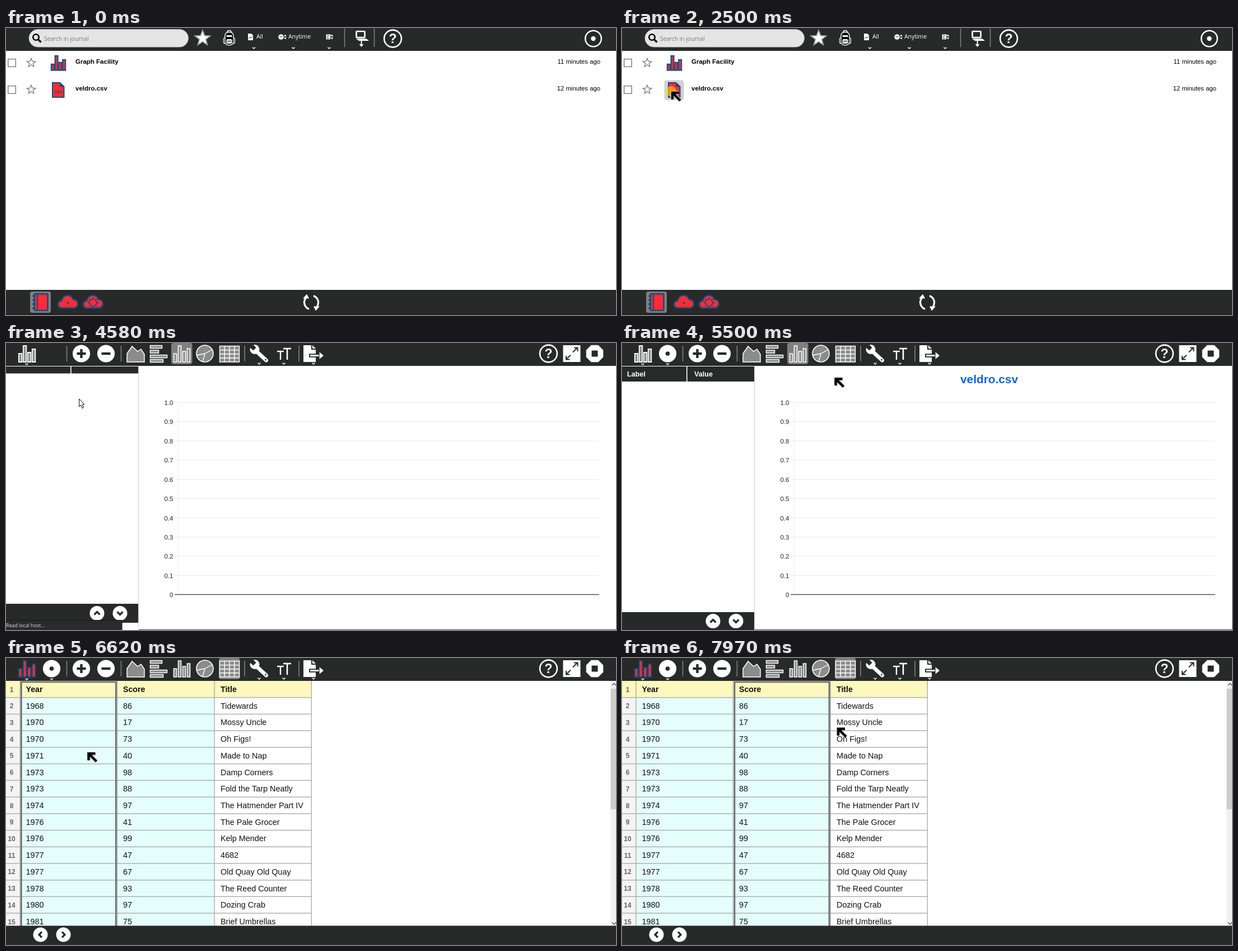
These frames come from a looping animation (1089x514 px, 8000 ms). An HTML page with a canvas:

```html
<!DOCTYPE html>
<html lang="en">
<head>
<meta charset="utf-8">
<title>Journal to chart</title>
<style>
html, body { margin: 0; width: 100%; height: 100%; overflow: hidden; background: #fff; }
canvas { display: block; }
</style>
</head>
<body>
<canvas id="stage" width="1089" height="514"></canvas>
<script>
const g = document.getElementById('stage').getContext('2d');
const LOOP = 8000;
const BAR = '#282a29', WHITE = '#fff', GRAY = '#808080', RED = '#ff2b34', BLUE = '#0d4d84';
const SANS = '"Liberation Sans", Arial, sans-serif', UI = '"Open Sans", sans-serif';
const FILE = 'veldro.csv';

// drawing helpers
function paint(fill, stroke, width = 1) {
  if (fill) { g.fillStyle = fill; g.fill(); }
  if (stroke) { g.strokeStyle = stroke; g.lineWidth = width; g.stroke(); }
}
function rect(x, y, w, h, fill, stroke, width, r = 0) {
  g.beginPath();
  g.roundRect(x, y, w, h, r);
  paint(fill, stroke, width);
}
function disc(x, y, r, fill, stroke, width) {
  g.beginPath();
  g.arc(x, y, r, 0, 7);
  paint(fill, stroke, width);
}
function poly(points, fill, stroke, width) {
  g.beginPath();
  points.forEach(p => g.lineTo(...p));
  g.closePath();
  paint(fill, stroke, width);
}
function line(points, color, width = 1) {
  g.beginPath();
  points.forEach(p => g.lineTo(...p));
  paint(null, color, width);
}
function text(s, x, y, font, color, align = 'left') {
  g.font = font;
  g.fillStyle = color;
  g.textAlign = align;
  g.fillText(s, x, y);
}
function star(x, y, r, fill, stroke, width) {
  const points = [];
  for (let i = 0; i < 10; i++) {
    const a = i * Math.PI / 5 - Math.PI / 2, d = i % 2 ? r * 0.42 : r;
    points.push([x + d * Math.cos(a), y + d * Math.sin(a)]);
  }
  poly(points, fill, stroke, width);
}
const chevron = (x, y = 37) => line([[x - 2.5, y - 1.5], [x, y + 1], [x + 2.5, y - 1.5]], WHITE, 1.4);
const separator = (x, top, bottom) => line([[x, top], [x, bottom]], GRAY, 1.6);

function bars(x, bottom, heights, fill, stroke, step, w, width) {
  heights.forEach((h, i) => rect(x + i * step, bottom - h, w, h, fill, stroke, width));
}
function help(x) {
  disc(x, 19, 15.4, null, WHITE, 2.6);
  text('?', x, 27, 'bold 23px ' + SANS, WHITE, 'center');
}
function arrowButton(x, y, dx, dy) {
  disc(x, y, 13, WHITE);
  const tip = [x + dx * 2.5, y + dy * 2.5];
  line([[tip[0] - dx * 5 + dy * 5, tip[1] - dy * 5 + dx * 5], tip,
    [tip[0] - dx * 5 - dy * 5, tip[1] - dy * 5 - dx * 5]], BAR, 3.2);
}

// journal screen
function searchField() {
  rect(41, 2.5, 284.5, 31.5, '#e5e5e5', '#c4c4c4', 1, 15.7);
  disc(53.5, 16.5, 5.2, null, '#000', 2.6);
  line([[57.5, 20.5], [62.5, 25.5]], '#000', 3.2);
  text('Search in journal', 68, 22.5, '10.2px ' + UI, '#777');
}
function backpack() {
  rect(395, 4.5, 7, 6, BAR, WHITE, 1.4, 3);
  rect(388.5, 17, 20, 11, '#000', WHITE, 1.2, 3);
  rect(391, 7.5, 15, 23, '#000', WHITE, 1.4, 6);
  rect(393.5, 13, 10, 3, WHITE);
  rect(393.5, 20, 10, 8, WHITE, null, 0, 2);
  line([[395, 23.5], [402, 23.5]], '#000', 1.2);
}
function filters() {
  const font = '10.4px ' + UI;
  poly([[432, 10], [438, 10], [441, 13], [441, 22], [432, 22]], WHITE);
  line([[433.5, 19], [436, 16], [437.5, 18], [440, 15]], BAR);
  text('All', 447, 19, font, WHITE);
  disc(491, 16, 4.8, WHITE);
  line([[488, 14], [491, 16.5], [494, 14]], BAR);
  rect(571.5, 11.5, 7.5, 9, WHITE);
  for (let y = 14; y < 20; y += 2.5) line([[573, y], [577, y]], BAR);
  line([[575, 18], [580, 12]], WHITE, 1.5);
  for (const x of [498.5, 582]) {
    poly([[x - 2.3, 15], [x, 11.5], [x + 2.3, 15]], WHITE);
    poly([[x - 2.3, 17], [x, 20.5], [x + 2.3, 17]], WHITE);
  }
  text('Anytime', 504, 19, font, WHITE);
  [442.5, 513, 577].forEach(x => chevron(x, 36));
}
function device() {
  rect(625.5, 6, 15, 11, null, WHITE, 2.6, 1);
  poly([[625, 19], [643, 19], [648, 23], [630, 23]], WHITE);
  line([[634.5, 22], [634.5, 32]], WHITE, 2);
  poly([[630.5, 29], [638.5, 29], [634.5, 34]], WHITE);
}
function csvIcon() {
  poly([[83, 98], [96, 98], [103.5, 105], [103.5, 124], [83, 124]], RED, BLUE, 2);
  poly([[96, 98], [96, 105], [103.5, 105]], BLUE);
  text('CSV', 93.5, 117, 'bold 7px ' + SANS, BLUE, 'center');
}
function journalRow(y, name, age) {
  rect(3.7, y - 6.3, 13.6, 13.6, WHITE, '#707070', 1.3);
  star(45, y + 0.5, 8.2, WHITE, '#707070', 1.2);
  text(name, 124, y + 2, 'bold 11.5px ' + SANS, '#000');
  text(age, 1061, y + 2, '11.3px ' + SANS, '#000', 'right');
}
function cloud(x) {
  g.beginPath();
  g.moveTo(x - 12, 501.5);
  g.bezierCurveTo(x - 20, 500, x - 19, 488, x - 11, 488.5);
  g.bezierCurveTo(x - 9, 476, x + 6, 476, x + 9, 486);
  g.bezierCurveTo(x + 20, 486, x + 20, 500, x + 11, 501.5);
  g.closePath();
  paint(RED, BLUE, 2.6);
}
function syncIcon() {
  for (const turn of [0, Math.PI]) {
    g.save();
    g.translate(545, 491.5);
    g.rotate(turn);
    g.beginPath();
    g.arc(0, 0, 12.5, -1.25, 0.65);
    paint(null, WHITE, 3.2);
    poly([[4, 7], [15, 7], [8, 15]], WHITE);
    g.restore();
  }
}
function journal(t) {
  rect(0, 0, 1089, 41, BAR);
  searchField();
  star(351, 18.5, 14.5, WHITE, '#a0a0a0', 1.8);
  backpack();
  filters();
  separator(604.5, 1, 34);
  separator(657.5, 1, 34);
  device();
  help(690.5);
  disc(1048.5, 19, 14.3, null, WHITE, 2.5);
  disc(1048.5, 19, 4.2, WHITE);

  journalRow(62, 'Graph Facility', '11 minutes ago');
  bars(80.8, 75.8, [11, 26, 14, 19], RED, BLUE, 6.8, 5, 2);
  journalRow(110, FILE, '12 minutes ago');
  if (t >= 1600) rect(75.5, 93.5, 35, 35.5, '#d2d2d2', null, 0, 4);
  csvIcon();

  rect(0, 469, 1089, 45, BAR);
  rect(0, 513, 1089, 1, '#151515');
  rect(43, 472, 37, 38, GRAY, null, 0, 4);
  rect(50.5, 476, 24, 30, RED, BLUE, 2.5, 1);
  line([[56, 476], [56, 506]], BLUE, 2);
  for (let y = 480; y < 506; y += 7.3) line([[47, y], [53, y]], BLUE, 2.4);
  cloud(110.5);
  disc(110.5, 492, 2, BLUE);
  cloud(155.5);
  for (let i = 0; i < 8; i++) {
    const a = i * Math.PI / 4;
    disc(155.5 + 7 * Math.cos(a), 492 + 7 * Math.sin(a), 1.9, BLUE);
  }
  syncIcon();
}

// chart toolbar: each tool appears at its own time
function wrench() {
  g.lineCap = 'round';
  line([[446, 14], [464.5, 31]], WHITE, 7);
  g.lineCap = 'butt';
  disc(444, 11.5, 8.5, WHITE);
  poly([[433, 6], [439, 0], [446.5, 8.5], [441.5, 13.5]], BAR);
  disc(463.5, 30, 1.4, BAR);
  chevron(452);
}
function exportIcon() {
  poly([[531, 4], [545, 4], [545, 12], [553, 12], [553, 34], [531, 34]], WHITE);
  poly([[547, 4], [553, 10], [547, 10]], WHITE);
  line([[541, 22.5], [563, 22.5]], BAR, 6.5);
  line([[543, 22.5], [563, 22.5]], WHITE, 3);
  poly([[559, 15], [568, 22.5], [559, 30]], WHITE, BAR, 1.2);
  chevron(549);
}
function fullscreen() {
  rect(994.5, 4, 31, 30, WHITE);
  line([[1012, 16.5], [1020, 8.5]], BAR, 2);
  line([[1008, 21.5], [1000, 29.5]], BAR, 2);
  line([[1014, 8.5], [1020.5, 8.5], [1020.5, 15]], BAR, 2);
  line([[1000, 23], [1000, 29.5], [1006.5, 29.5]], BAR, 2);
}
function stopIcon() {
  const points = [];
  for (let i = 0; i < 8; i++) {
    const a = (i + 0.5) * Math.PI / 4;
    points.push([1051 + 16.5 * Math.cos(a), 19 + 16.5 * Math.sin(a)]);
  }
  poly(points, WHITE);
  rect(1045.5, 13.5, 11, 11, BAR);
}
function tableIcon() {
  rect(381.5, 5.5, 35, 28.5, '#8c8c8c', WHITE, 1.4);
  for (let i = 1; i < 4; i++) {
    const x = 381.5 + i * 8.75, y = 5.5 + i * 7.1;
    line([[x, 5.5], [x, 34]], WHITE, 1.4);
    line([[381.5, y], [416.5, y]], WHITE, 1.4);
  }
}
function pieIcon() {
  disc(355, 19, 15, '#8c8c8c', WHITE, 1.6);
  for (const [x, y] of [[340, 22], [368, 12], [351, 33.5]]) line([[355, 19], [x, y]], WHITE, 1.4);
}
function barIcon() {
  [[4.5, 21], [13, 15], [21.5, 30], [29.5, 23]].forEach(([y, w]) =>
    rect(257.5, y, w, 5, '#8c8c8c', WHITE, 1.5));
}
function roundTool(x, plus) {
  disc(x, 19, 15.6, WHITE);
  rect(x - 8, 16.8, 16, 4.4, BAR);
  if (plus) rect(x - 2.2, 11, 4.4, 16, BAR);
}
function textSize() {
  line([[484, 15], [496, 15]], WHITE, 2.4);
  line([[490, 15], [490, 30]], WHITE, 2.4);
  line([[495, 10], [509, 10]], WHITE, 2.6);
  line([[502, 10], [502, 30]], WHITE, 2.6);
  chevron(496);
}
const AREA = [[216, 34], [216, 19], [225, 6], [235, 15], [241, 11], [247, 20], [247, 34]];
const TOOLS = [
  [3880, table => {
    bars(22.8, 34, [15, 29, 17, 23], table ? RED : '#8c8c8c', table ? BLUE : WHITE, 8, 5.5, 1.8);
    chevron(37, 38);
  }],
  [4050, () => roundTool(134.5, true)],
  [4210, () => { roundTool(178.5); help(968.5); stopIcon(); wrench(); }],
  [4480, () => {
    poly(AREA, '#8c8c8c', WHITE, 1.5);
    barIcon();
    bars(299.5, 34, [15, 29, 19, 24], '#8c8c8c', WHITE, 8, 5, 1.6);
    pieIcon();
    tableIcon();
  }],
  [4580, () => { textSize(); exportIcon(); fullscreen(); }],
  [4730, () => { disc(81.5, 19, 15.6, WHITE); disc(81.5, 19, 3.8, BAR); chevron(81.5, 38); }]
];
function toolbar(t, table) {
  rect(0, 0, 1089, 41, BAR);
  [108.5, 205.5, 426, 523].forEach(x => separator(x, 5, 33));
  rect(table ? 380 : 295, 0, 37.5, 38, GRAY, null, 0, 4);
  TOOLS.forEach(([from, draw]) => { if (t >= from) draw(table); });
}

function chart(t) {
  const ready = t >= 4880;
  toolbar(t, false);
  rect(0, 42, 236, ready ? 27 : 12.5, BAR);
  rect(115, 41, 1.6, 28.5, WHITE);
  const foot = ready ? 482 : 467;
  rect(0, foot, 236, ready ? 32 : 34, BAR);
  line([[236.7, 41], [236.7, 514]], '#d4d4d4', 1.2);
  if (t >= 3800) {
    const y = ready ? 498 : 484;
    arrowButton(162.5, y, 0, -1);
    arrowButton(203.5, y, 0, 1);
  }
  if (ready) {
    text('Label', 9, 60, 'bold 12.6px ' + SANS, WHITE);
    text('Value', 129, 60, 'bold 12.6px ' + SANS, WHITE);
    text(FILE, 655.5, 71.5, 'bold 20.8px ' + SANS, '#0c63dc', 'center');
  }
  line([[307.5, 106], [307.5, 450]], '#efefef');
  for (let i = 0; i <= 10; i++) {
    const y = Math.round(106 + i * 34.43) + 0.5;
    line([[301, y], [1059, y]], i < 10 ? '#ececec' : '#555', i < 10 ? 1 : 1.4);
    text(i < 10 ? (1 - i / 10).toFixed(1) : '0', 298.5, y + 4, '11.5px ' + SANS, '#222', 'right');
  }
  rect(237, 513, 852, 1, '#444');
}

// table screen
const ROWS = [
  ['Year', 'Score', 'Title'],
  [1968, 86, 'Tidewards'],
  [1970, 17, 'Mossy Uncle'],
  [1970, 73, 'Oh Figs!'],
  [1971, 40, 'Made to Nap'],
  [1973, 98, 'Damp Corners'],
  [1973, 88, 'Fold the Tarp Neatly'],
  [1974, 97, 'The Hatmender Part IV'],
  [1976, 41, 'The Pale Grocer'],
  [1976, 99, 'Kelp Mender'],
  [1977, 47, '4682'],
  [1977, 67, 'Old Quay Old Quay'],
  [1978, 93, 'The Reed Counter'],
  [1980, 97, 'Dozing Crab'],
  [1981, 75, 'Brief Umbrellas']
];
function table(t) {
  const pitch = 29.72;
  rect(0, 41, 25, 439, '#f4f4f4');
  rect(25, 41, 347, 439, '#e4fefc');
  rect(0, 41, 545, pitch, '#fcf8be');
  ROWS.forEach((row, i) => {
    const base = 61 + i * pitch, y = 41 + (i + 1) * pitch;
    line([[0, y], [545.5, y]], '#b0b0b0', 1.5);
    text(i + 1, 10, base - 0.5, 'bold 12px ' + SANS, '#666', 'center');
    row.forEach((cell, c) =>
      text(cell, [35.5, 209, 383][c], base, (i ? '14.4px ' : 'bold 14.2px ') + SANS, '#111'));
  });
  [25, 198.5, 372.2, 545.3].forEach(x => line([[x, 41], [x, 480]], '#b0b0b0', 1.5));
  rect(t < 7630 ? 27.3 : 201, 43, 169, 460, null, '#6a6a6c', 2.6);

  rect(1079, 41, 10, 439, '#f0f0f0');
  rect(1079.5, 55, 9.5, 216, '#cdcdcd');
  line([[1082, 49], [1085.5, 45.5], [1089, 49]], '#555', 1.4);
  line([[1082, 473.5], [1085.5, 477], [1089, 473.5]], '#555', 1.4);
  toolbar(t, true);
  rect(0, 479.5, 1089, 34.5, BAR);
  arrowButton(61.5, 495.5, -1, 0);
  arrowButton(102.5, 495.5, 1, 0);
}

// overlays
function status(t) {
  if (t < 2760 || t >= 4880) return;
  const reading = t >= 3070 && t < 3190 || t >= 4480 && t < 4730;
  rect(-1, 496.5, 208, 19, '#2b2b2d', '#151515');
  text((reading ? 'Read' : 'Transferring data from') + ' local host...', 0, 509, '8.8px ' + UI, '#e0e0e0');
}
const PATH = [
  [480, 919, 465], [680, 660, 313], [800, 480, 192], [860, 440, 168], [930, 380, 158],
  [1000, 300, 198], [1130, 40, 152], [1260, 1, 141], [1310, 14, 126], [1650, 88, 114],
  [3510, 88, 114], [4880, 131, 102], [5500, 379.5, 62.5], [5650, 395, 43], [5770, 395, 33],
  [6160, 395, 33], [6620, 146, 169.5], [6750, 84, 130], [6890, 88, 97], [6970, 88, 97],
  [7430, 258, 97], [7630, 258, 97], [7970, 384, 125]
];
function pointerAt(t) {
  const i = PATH.findIndex(p => p[0] > t);
  if (i < 0) return PATH[PATH.length - 1].slice(1);
  const [t0, x0, y0] = PATH[i - 1], [t1, x1, y1] = PATH[i];
  const k = (t - t0) / (t1 - t0);
  return [x0 + (x1 - x0) * k, y0 + (y1 - y0) * k];
}
function pointer(t) {
  if (t < 480) return;
  g.save();
  if (t >= 3510 && t < 4880) {
    g.translate(130.7, 100);
    poly([[0, 0], [0, 14], [3.2, 11.2], [5.4, 16.8], [7.8, 15.8], [5.5, 10.3], [9.2, 10]], WHITE, '#000', 1);
  } else {
    g.translate(...pointerAt(t));
    for (const [color, width] of [['#d8d8d8', 6.6], ['#000', 4.4]]) {
      line([[14, 2], [2, 2], [2, 14]], color, width);
      line([[3, 3], [16, 16]], color, width);
    }
  }
  g.restore();
}

function draw() {
  const t = performance.now() % LOOP;
  rect(0, 0, 1089, 514, WHITE);
  if (t < 3510) journal(t);
  else if (t < 5650) chart(t);
  else table(t);
  if (t >= 2500 && t < 2600) disc(87.5, 113.5, 9.5, 'rgba(255,220,0,0.6)');
  status(t);
  pointer(t);
  requestAnimationFrame(draw);
}
draw();
</script>
</body>
</html>
```
